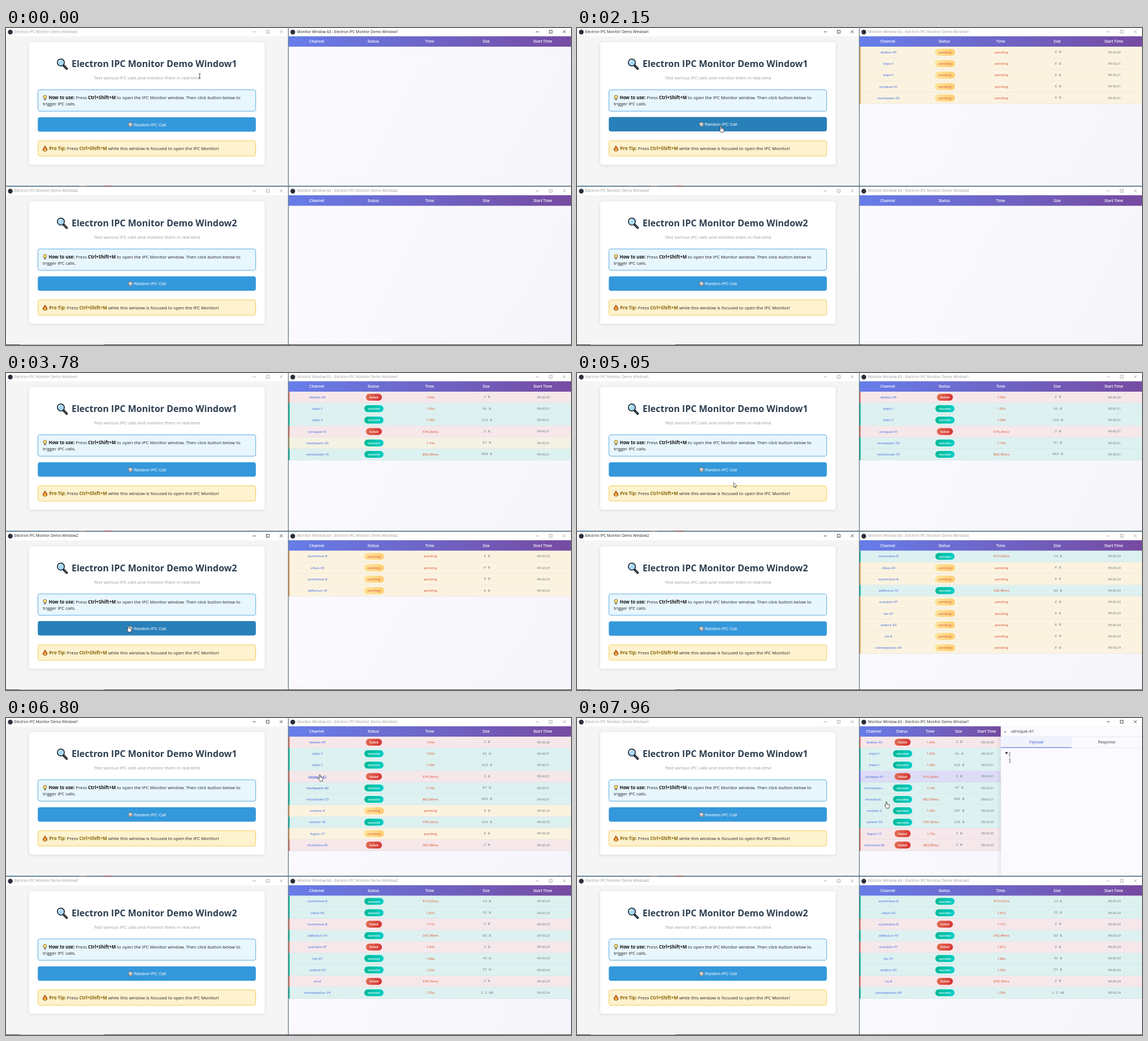
Animation, 999 px wide and 561 px high, one loop 7.99 s. Source, as an HTML page with a canvas:

```html
<!DOCTYPE html>
<html lang="en">
<head>
<meta charset="utf-8">
<title>IPC Monitor Demo</title>
<style>
html, body { margin: 0; width: 100%; height: 100%; overflow: hidden; background: #f5f5f5; }
canvas { display: block; width: 999px; height: 561px; }
</style>
</head>
<body>
<canvas id="stage" width="999" height="561"></canvas>
<script>
const c = document.getElementById('stage').getContext('2d');
const LOOP = 7.99, LOWER = 281.6, OPEN_AT = 7.2;
const SANS = '"Open Sans", "Noto Sans", sans-serif';
const ARIAL = '"Liberation Sans", sans-serif';
const MONO = '"Liberation Mono", monospace';

// channel, start (s), duration (ms), size, succeeded
const TOP_ROWS = [
  ['dedico-45', 1.32, 1940, '2 B', 0],
  ['stips-1', 1.45, 1920, '61 B', 1],
  ['stips-1', 1.62, 1580, '123 B', 1],
  ['utroque-41', 1.8, 574.26, '2 B', 0],
  ['numquam-32', 2, 1740, '87 B', 1],
  ['vicissitudo-15', 2.3, 862.95, '663 B', 1],
  ['creator-2', 5.53, 1300, '297 B', 1],
  ['autem-18', 5.75, 745.32, '134 B', 1],
  ['fugiat-17', 5.93, 1720, '2 B', 0],
  ['charisma-36', 6.08, 383.58, '2 B', 0]
];
const LOW_ROWS = [
  ['summisse-8', 3.42, 913.52, '14 B', 1],
  ['cibus-43', 3.52, 1870, '22 B', 1],
  ['summisse-8', 3.62, 1770, '2 B', 0],
  ['adfectus-19', 3.72, 242.99, '83 B', 1],
  ['suscipio-47', 3.98, 1870, '2 B', 0],
  ['tot-37', 4.18, 1860, '42 B', 1],
  ['umbra-33', 4.42, 1520, '57 B', 1],
  ['vis-6', 4.5, 978.76, '2 B', 0],
  ['consequatur-24', 4.72, 1550, '1.2 KB', 1]
];
const STATES = {
  pending: { bg: [251, 243, 224], bar: [240, 162, 80], pill: ['#ffe69c', '#fdcb6e'], ink: '#e17055' },
  success: { bg: [220, 241, 240], bar: [0, 184, 148], pill: ['#00b894', '#00cec9'], ink: '#fff' },
  failed: { bg: [246, 231, 234], bar: [225, 112, 85], pill: ['#e17055', '#d63031'], ink: '#fff' }
};
// time, x, y
const PATH = [
  [0, 342.5, 85], [0.24, 448, 150], [0.46, 444, 230], [0.68, 300, 215], [0.86, 254.5, 174],
  [2.35, 254.5, 174], [2.86, 235, 412], [3.25, 216.5, 448], [4.6, 216.5, 448],
  [5.05, 277, 194], [5.35, 283.5, 178], [6.15, 283.5, 178], [6.6, 553, 124],
  [6.66, 553, 124], [6.76, 555, 101], [7.72, 555, 101], [7.9, 547, 149]
];
const FOCUS = [[0, 2], [1.3, 0], [3.38, 1], [5.42, 0], [7.15, 2]];

const clamp = v => Math.max(0, Math.min(1, v));
const ease = v => { v = clamp(v); return v * v * (3 - 2 * v); };
const lerp = (a, b, k) => a + (b - a) * k;
const blend = (a, b, k) => `rgb(${a.map((v, i) => Math.round(lerp(v, b[i], k)))})`;
const inside = (p, x0, y0, x1, y1) => p.x >= x0 && p.x <= x1 && p.y >= y0 && p.y <= y1;

function soft(test, t, span) {
  let sum = 0;
  for (let i = 0; i < 10; i++) sum += test(Math.max(0, t - span * i / 10)) ? 1 : 0;
  return sum / 10;
}
function rect(x, y, w, h, fill) { c.fillStyle = fill; c.fillRect(x, y, w, h); }
function box(x, y, w, h, r, fill, stroke) {
  c.beginPath();
  c.roundRect(x, y, w, h, r);
  c.fillStyle = fill;
  c.fill();
  if (stroke) { c.strokeStyle = stroke; c.lineWidth = 0.9; c.stroke(); }
}
function font(size, weight = 400, family = SANS) { c.font = `${weight} ${size}px ${family}`; }
function text(s, x, y, size, color, weight, align = 'center', family) {
  font(size, weight, family);
  c.textAlign = align;
  c.fillStyle = color;
  c.fillText(s, x, y + size * 0.34);
}
function runs(x, y, size, parts) {
  for (const [s, color, weight] of parts) {
    text(s, x, y, size, color, weight, 'left');
    x += c.measureText(s).width;
  }
}
function shape(points, fill, stroke, width = 0.8) {
  c.beginPath();
  points.forEach(([x, y], i) => i ? c.lineTo(x, y) : c.moveTo(x, y));
  c.closePath();
  c.fillStyle = fill;
  c.fill();
  if (stroke) { c.strokeStyle = stroke; c.lineWidth = width; c.lineJoin = 'round'; c.stroke(); }
}
function disc(x, y, r, fill, stroke, width) {
  c.beginPath();
  c.arc(x, y, r, 0, 7);
  c.fillStyle = fill;
  c.fill();
  if (stroke) { c.strokeStyle = stroke; c.lineWidth = width; c.stroke(); }
}
function line(x0, y0, x1, y1, color, width) {
  c.beginPath();
  c.moveTo(x0, y0);
  c.lineTo(x1, y1);
  c.strokeStyle = color;
  c.lineWidth = width;
  c.stroke();
}
function sweep(x0, y0, x1, y1, from, to) {
  const g = c.createLinearGradient(x0, y0, x1, y1);
  g.addColorStop(0, from);
  g.addColorStop(1, to);
  return g;
}

function pointer(t) {
  let i = 0;
  while (i < PATH.length - 2 && t > PATH[i + 1][0]) i++;
  const [t0, x0, y0] = PATH[i], [t1, x1, y1] = PATH[i + 1];
  const k = ease((t - t0) / (t1 - t0));
  return { x: lerp(x0, x1, k), y: lerp(y0, y1, k) };
}
const onButton = (t, oy) => inside(pointer(t), 56, 158 + oy, 442, 183 + oy);

function titleBar(x, y, title, active) {
  rect(x, y, 499.5, 14.4, '#fff');
  disc(x + 7.6, y + 7.2, 4.2, '#2b2e3a');
  text(title, x + (x ? 15.3 : 14.5), y + 6.6, 6.55, active ? '#222' : '#999', 400, 'left');
  const ink = active ? '#222' : '#9a9a9a', bx = x + (x ? 440 : 439), by = y + 6.6;
  line(bx - 2.7, by + 0.2, bx + 2.7, by + 0.2, ink, 0.8);
  c.lineWidth = 0.8;
  c.strokeRect(bx + 21.2, by - 2.5, 5, 5);
  line(bx + 45.2, by - 2.5, bx + 50.2, by + 2.5, ink, 0.8);
  line(bx + 45.2, by + 2.5, bx + 50.2, by - 2.5, ink, 0.8);
}

function magnifier() {
  c.lineCap = 'round';
  line(102, 66.5, 107.3, 72, '#22282d', 4.2);
  line(103.2, 67.6, 107, 71.6, '#4a5157', 1.8);
  disc(97, 61, 6.2, '#a9d8f5', '#22313b', 1.7);
  c.beginPath();
  c.arc(97, 61, 4, 3.3, 4.6);
  c.strokeStyle = '#eaf7ff';
  c.lineWidth = 1.6;
  c.stroke();
  c.lineCap = 'butt';
}
function bulb() {
  rect(67, 124, 3.8, 3.8, '#777');
  disc(68.9, 122, 3, '#ffdf75', '#6b5521', 0.8);
  line(67.2, 126, 70.6, 126, '#ddd', 0.6);
}
function flame() {
  const leaf = (x, y, w, h, fill, stroke) => {
    c.beginPath();
    c.moveTo(x - w * 0.1, y - h);
    c.bezierCurveTo(x + w * 0.5, y - h * 0.7, x + w, y - h * 0.5, x + w, y - h * 0.28);
    c.bezierCurveTo(x + w, y + h * 0.1, x - w, y + h * 0.1, x - w, y - h * 0.28);
    c.bezierCurveTo(x - w, y - h * 0.6, x - w * 0.3, y - h * 0.6, x - w * 0.1, y - h);
    c.fillStyle = fill;
    c.fill();
    if (stroke) { c.strokeStyle = stroke; c.lineWidth = 0.8; c.stroke(); }
  };
  leaf(69, 218, 3.7, 9.6, '#e8702a', '#5a2c16');
  leaf(69, 217.6, 2, 5, '#ffc83d');
}
function die(y) {
  shape([[220, y - 4], [223.6, y - 2.2], [223.6, y + 2.2], [220, y + 4], [216.4, y + 2.2], [216.4, y - 2.2]], '#f1f1f1', '#444', 0.7);
  shape([[220, y], [223.4, y - 2], [223.4, y + 2], [220, y + 3.7]], '#c9c9c9');
  for (const [dx, dy] of [[0, -2], [-2, 0.3], [-1.5, 1.9], [1.8, 1]]) disc(220 + dx, y + dy, 0.65, '#333');
}

function demoWindow(n, oy, t, active) {
  rect(0, oy, 499, 280, '#f5f5f5');
  titleBar(0, oy, 'Electron IPC Monitor Demo Window' + n, active);
  c.save();
  c.translate(0, oy);
  c.shadowColor = 'rgba(0,0,0,.12)';
  c.shadowBlur = 5;
  c.shadowOffsetY = 1;
  box(41, 25, 416.5, 217, 4.5, '#fff');
  c.shadowColor = 'transparent';

  magnifier();
  text('Electron IPC Monitor Demo Window' + n, 116, 64, 15.98, '#2c3e50', 700, 'left');
  text('Test various IPC calls and monitor them in real-time', 249.5, 88.6, 7.86, '#8f9b9c');

  box(56.5, 109.4, 385, 37.8, 3.5, '#e8f6fe', '#4ba3dd');
  bulb();
  runs(75.4, 123.5, 7.86, [['How to use:', '#111', 700], [' Press ', '#222', 400],
    ['Ctrl+Shift+M', '#111', 700], [' to open the IPC Monitor window. Then click button below to', '#222', 400]]);
  text('trigger IPC calls.', 65, 134.3, 7.86, '#222', 400, 'left');

  const h = soft(s => onButton(s, oy), t, 0.2), lift = -0.5 * h;
  box(56.2, 158 + lift, 385.6, 25.4, 4, blend([52, 152, 219], [41, 128, 185], h));
  die(171 + lift);
  text('Random IPC Call', 226, 171 + lift, 7.36, '#fff', 400, 'left', ARIAL);

  box(56.5, 199.5, 385, 27.2, 3.5, '#fff2ce', '#f2c84f');
  flame();
  runs(76.3, 213.6, 7.86, [['Pro Tip:', '#856404', 700], [' Press ', '#222', 400],
    ['Ctrl+Shift+M', '#856404', 700], [' while this window is focused to open the IPC Monitor!', '#222', 400]]);
  c.restore();
}

const rowY = (i, oy) => oy + 33 + 20.22 * i;
const tableWidth = (t, oy) => oy ? 499.5 : lerp(499.5, 250, ease((t - OPEN_AT) / 0.25));

function clip(s, max) {
  if (c.measureText(s).width <= max) return s;
  while (s && c.measureText(s + '…').width > max) s = s.slice(0, -1);
  return s + '…';
}
function linkHover(t, i, name, oy) {
  if (t > OPEN_AT) return false;
  font(6.1, 600);
  const half = c.measureText(name).width / 2, y = rowY(i, oy) + 9.8;
  return inside(pointer(t), 551 - half, y - 6, 551 + half, y + 6);
}

function tableRow([name, start, ms, size, ok], i, oy, t, w) {
  const end = start + ms / 1000, done = t >= end;
  const state = done ? (ok ? 'success' : 'failed') : 'pending';
  const look = STATES[state], k = done ? clamp((t - end) / 0.15) : 1;
  const y = rowY(i, oy), cy = y + 9.8, col = w / 5;
  const x = n => 499.5 + col * (n + 0.5) + 1.2;
  const picked = !oy && i === 3 && t > OPEN_AT;

  rect(499.5, y, w, 20.22, picked ? '#dcdcf6' : blend(STATES.pending.bg, look.bg, k));
  rect(499.5, y + 19.6, w, 0.7, 'rgba(90,90,120,.1)');
  rect(499.5, y, 2, 20.22, picked ? '#667eea' : blend(STATES.pending.bar, look.bar, k));

  font(6.1, 600);
  const label = clip(name, col - 14);
  const dark = soft(s => linkHover(s, i, name, oy), t, 0.2);
  const ink = blend([100, 128, 226], [62, 76, 200], dark);
  text(label, x(0), cy, 6.1, ink, 600);
  if (linkHover(t, i, name, oy)) {
    const lw = c.measureText(label).width;
    rect(x(0) - lw / 2, cy + 3, lw, 0.6, ink);
  }

  font(5.9, 600);
  const pw = c.measureText(state).width + 12.4, px = x(1) - pw / 2;
  box(px, cy - 6, pw, 12.2, 6.1, sweep(px, cy - 6, px + pw, cy + 6, ...look.pill));
  text(state, x(1), cy + 0.2, 5.9, look.ink, 600);

  const took = ms < 1000 ? ms.toFixed(2) + 'ms' : (ms / 1000).toFixed(2) + 's';
  text(done ? took : 'pending', x(2), cy, 6.1, '#e17055', 600);
  text(done ? size : '0 B', x(3), cy - 0.6, 6.2, '#6f7a7e', 400, 'center', MONO);
  text('09:42:' + Math.floor(19.6 + start), x(4), cy, 5.7, '#636e72');
}

function drawer(x) {
  c.save();
  c.beginPath();
  c.rect(499.5, 14.4, 499.5, 265);
  c.clip();
  c.shadowColor = 'rgba(0,0,0,.18)';
  c.shadowBlur = 9;
  rect(x, 14.4, 250, 266, '#fafaff');
  c.shadowColor = 'transparent';
  text('×', x + 7.2, 23.8, 8, '#555');
  text('utroque-41', x + 17.7, 23.8, 7.86, '#333', 400, 'left');
  rect(x, 32.6, 250, 0.8, '#e0e2ee');
  rect(x, 33.2, 125, 19.4, '#f0f2fd');
  text('Payload', x + 62.5, 42.6, 6.6, '#667eea', 600);
  text('Response', x + 187.3, 42.6, 6.6, '#666', 600);
  rect(x, 52.4, 250, 0.7, '#e0e2ee');
  rect(x, 51.8, 125, 1.2, '#667eea');
  shape([[x + 7.4, 60.6], [x + 12.6, 60.6], [x + 10, 64.6]], '#222');
  text('[', x + 13.4, 63.4, 7.4, '#222', 400, 'left', MONO);
  text(']', x + 13.4, 74.2, 7.4, '#222', 400, 'left', MONO);
  c.restore();
}

function monitorWindow(n, oy, rows, t, active) {
  rect(499.5, oy, 499.5, 280, sweep(500, oy + 14, 999, oy + 280, '#fafaff', '#f5f5fb'));
  const w = tableWidth(t, oy);
  rect(499.5, oy + 14.4, w, 18.6, sweep(499.5, 0, 499.5 + w, 18, '#667eea', '#764ba2'));
  ['Channel', 'Status', 'Time', 'Size', 'Start Time'].forEach((s, i) =>
    text(s, 499.5 + w / 5 * (i + 0.5), oy + 23.8, 6.7, '#fff', 600));
  rows.forEach((row, i) => { if (t >= row[1]) tableRow(row, i, oy, t, w); });
  if (w < 499) drawer(499.5 + w);
  titleBar(499.5, oy, `Monitor Window $${n + 2} - Electron IPC Monitor Demo Window${n}`, active);
}

function borders() {
  rect(498.7, 0, 1, 561, '#3a5566');
  rect(0, 279.3, 999, 1.4, '#345a70');
  [[6, 14, '#4a86b0'], [48, 8, '#5a9bd0'], [90, 15, '#7c8ea0'], [130, 12, '#c9a3a0'], [172, 16, '#b5453c']]
    .forEach(([x, w, color]) => rect(x, 279, w, 0.9, color));
  rect(0, 560, 999, 1, '#3a444a');
  rect(24, 560, 150, 1, '#a5a8aa');
}

function cursorKind(p, t) {
  for (const oy of [0, LOWER]) {
    const q = { x: p.x, y: p.y - oy };
    if (inside(q, 56, 158, 442, 183)) return 'hand';
    const areas = [[116, 54, 409, 74], [155, 83, 344, 93], [65, 119, 423, 138], [65, 208, 383, 218]];
    if (areas.some(a => inside(q, ...a))) return 'beam';
    const live = (oy ? LOW_ROWS : TOP_ROWS).filter(r => t >= r[1]).length;
    if (inside(q, 500, 33, 499 + tableWidth(t, oy), 33 + 20.22 * live)) return 'hand';
  }
  return 'arrow';
}
function cursor(t) {
  const p = pointer(t), kind = cursorKind(p, t);
  c.save();
  c.translate(p.x, p.y);
  if (kind === 'beam') {
    line(0, -3.6, 0, 3.6, '#333', 0.9);
    line(-1.8, -4, 1.8, -4, '#333', 0.8);
    line(-1.8, 4, 1.8, 4, '#333', 0.8);
  } else if (kind === 'hand') {
    shape([[-0.7, -0.6], [0.5, -0.6], [1, 0], [1, 3.5], [2.6, 3.6], [4.2, 4.1], [5.4, 4.8], [5.5, 7.4],
      [4.6, 9.2], [4.5, 10.7], [0, 10.7], [-0.4, 9.4], [-2.8, 6.4], [-2.7, 5.4], [-1.1, 6], [-1.1, 0]], '#fff', '#222', 0.8);
    line(2.4, 3.9, 2.4, 5.4, '#444', 0.5);
    line(4, 4.3, 4, 5.6, '#444', 0.5);
  } else {
    shape([[0, 0], [0, 8.3], [1.9, 6.6], [3.1, 9.3], [4.3, 8.8], [3.1, 6.1], [5.7, 5.9]], '#fff', '#222', 0.7);
  }
  c.restore();
}

function draw(now) {
  const t = now / 1000 % LOOP;
  const active = FOCUS.filter(f => t >= f[0]).pop()[1];
  c.clearRect(0, 0, 999, 561);
  monitorWindow(1, 0, TOP_ROWS, t, active === 2);
  monitorWindow(2, LOWER, LOW_ROWS, t, false);
  demoWindow(1, 0, t, active === 0);
  demoWindow(2, LOWER, t, active === 1);
  borders();
  cursor(t);
}
const begin = performance.now();
function tick() {
  draw(performance.now() - begin);
  requestAnimationFrame(tick);
}
tick();
</script>
</body>
</html>
```
